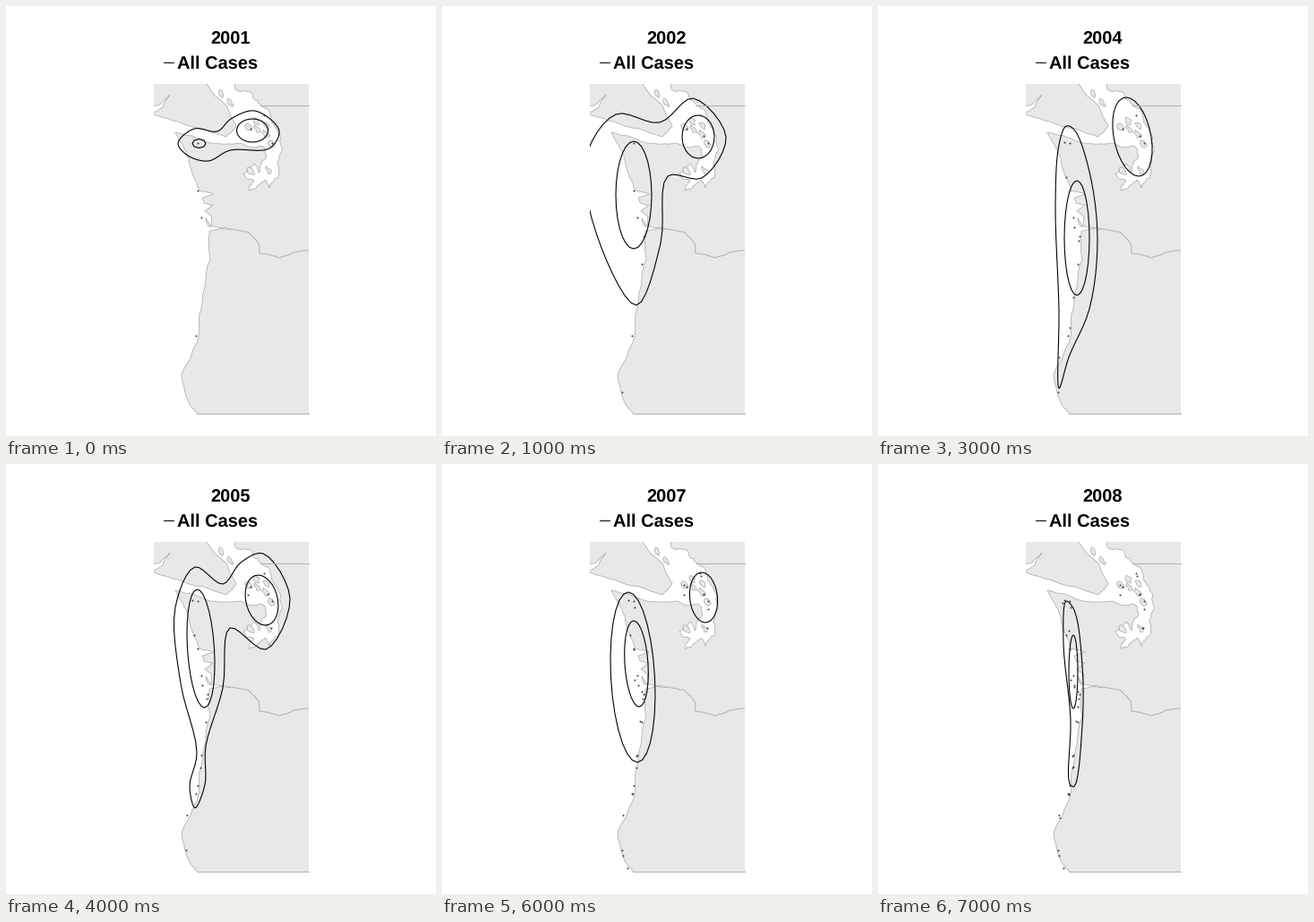
These frames come from a looping animation (480 by 480 pixels, 8000 ms). A matplotlib script:

```python
import matplotlib.pyplot as plt
import numpy as np
from matplotlib.animation import FuncAnimation
from matplotlib.patches import Polygon, Rectangle

SIZE, DPI = 480, 100
PX = 72 / DPI
LAND, SHORE = "#e8e8e8", "#b0b0b0"
YEARS = range(2001, 2009)

plt.rcParams["text.hinting"] = "none"
rng = np.random.default_rng(4)

fig = plt.figure(figsize=(SIZE / DPI, SIZE / DPI), dpi=DPI, facecolor="white")
ax = fig.add_axes([0, 0, 1, 1])
ax.set(xlim=(0, SIZE), ylim=(SIZE, 0))
ax.axis("off")

window = Rectangle((164.5, 87), 173, 368, fc=LAND, ec="none")
ax.add_patch(window)


def pairs(flat):
    return np.array(flat, float).reshape(-1, 2)


def rough(*flat, amp=0.06, depth=3):
    """Open line through key points, broken up by midpoint displacement."""
    p = pairs(flat)
    for _ in range(depth):
        step = np.diff(p, axis=0)
        normal = step[:, ::-1] * [-1, 1]
        mid = p[:-1] + step / 2 + normal * rng.uniform(-amp, amp, (len(step), 1))
        p = np.vstack([np.stack([p[:-1], mid], axis=1).reshape(-1, 2), p[-1:]])
    return p


def blob(*flat, steps=6):
    """Closed smooth curve through key points."""
    p = pairs(flat)
    after = np.roll(p, -1, axis=0)
    d = np.sqrt(np.linalg.norm(after - p, axis=1))[:, None]
    v = (after - p) / d
    d0, v0 = np.roll(d, 1, axis=0), np.roll(v, 1, axis=0)
    m = (v0 * d + v * d0) / (d + d0)
    m1 = np.roll(m, -1, axis=0)
    parts = [p * (1 + 2 * u) * (1 - u) ** 2 + after * u * u * (3 - 2 * u)
             + d * (m * u * (1 - u) ** 2 - m1 * u * u * (1 - u))
             for u in np.arange(steps) / steps]
    return np.stack(parts, axis=1).reshape(-1, 2)


def oval(cx, cy, rx, ry, lean=0, corners=28):
    """Ellipse whose lower end is shifted sideways by lean."""
    t = np.arange(corners) * 2 * np.pi / corners
    return np.column_stack([cx + rx * np.cos(t) + lean * np.sin(t),
                            cy + ry * np.sin(t)])


def shape(points, color):
    patch = ax.add_patch(Polygon(points, fc=color, ec=SHORE, lw=0.8 * PX))
    patch.set_clip_path(window)


def border(points):
    ax.plot(*points.T, color=SHORE, lw=PX)


# Water is one polygon: island shore, sound, strait, then the open coast
island_shore = rough(
    150, 111, 170, 111, 183, 99, 175, 113, 162, 120, 192, 129, 246, 146,
    257, 134, 247, 113, 233, 100, 222, 84, 220, 75)
sound = rough(
    255, 75, 257, 94, 271, 95, 284, 110, 296, 124, 303, 139, 308, 158,
    303, 175, 304, 191, 294, 203, 289, 194, 282, 200, 271, 206, 277, 195,
    265, 187, 278, 176, 283, 186, 290, 170, 287, 157, 273, 158, amp=0.2)
coast = rough(
    262, 153, 225, 152, 189, 141, 204, 170, 216, 206, 231, 210, 219, 214,
    221, 220, 231, 222, 222, 229, 230, 235, 229, 246, 223, 237, 226, 246,
    252, 249, 227, 251, 228, 283, 222, 313, 213, 376, 196, 412, 202, 438,
    213, 454.5, 213, 480, 150, 480)
shape(np.vstack([island_shore, sound, coast]), "white")

for cx, cy in pairs([271, 135, 279, 128, 280, 137, 290, 143, 296, 154,
                     291, 133, 293, 183, 273, 185, 240, 98, 250, 108]):
    islet = oval(cx, cy, 3, 4, lean=2, corners=9)
    shape(islet + rng.uniform(-1.3, 1.3, islet.shape), LAND)

border(pairs([284, 111, 337.5, 111]))
border(pairs([213, 454.5, 337.5, 454.5]))
border(rough(252, 249, 270, 252, 282, 265, 283, 276, 305, 281, 337.5, 273))

rings = {}


def contours(year, *curves):
    rings[year] = []
    for curve in curves:
        patch = Polygon(curve, fill=False, ec="black", lw=1.1 * PX, visible=False)
        rings[year].append(ax.add_patch(patch))
        patch.set_clip_path(window)


contours(2001,
         blob(192, 153, 210, 137, 236, 140, 251, 126, 278, 117, 305, 139,
              294, 159, 250, 161, 226, 173, 203, 167),
         oval(275, 139, 17.5, 13), oval(215.5, 153.5, 7.5, 5, corners=8))
contours(2002,
         blob(160, 172, 194, 121, 243, 130, 280, 103, 317, 146, 290, 192,
              252, 190, 244, 265, 217, 334, 178, 270),
         oval(214, 211, 20, 60), oval(286, 146, 18, 24))
contours(2003,
         blob(189, 150, 211, 103, 238, 129, 245, 152, 243, 200, 236, 310,
              216, 376, 210, 387, 206, 377, 200, 300, 195, 220),
         blob(201, 160, 213, 132, 226, 148, 228, 200, 227, 268, 218, 281,
              209, 220),
         oval(285, 144, 35.5, 62), oval(288, 144, 20, 37))
contours(2004,
         blob(210, 134, 219, 138, 236, 185, 245, 260, 236, 338, 213, 392,
              202, 427, 202, 340, 198, 220, 202, 155),
         oval(222, 259, 14, 64), oval(284, 146, 21, 44, lean=7))
contours(2005,
         blob(189, 160, 211, 115, 242, 134, 262, 110, 287, 100, 317, 150,
              290, 207, 250, 183, 242, 250, 223, 315, 222, 358, 211, 384,
              205, 360, 213, 322, 195, 245),
         oval(217.5, 206, 15, 66, lean=4), oval(285.5, 152, 18, 28, lean=4))
contours(2006,
         oval(217.5, 221, 25.5, 90, lean=5), oval(217.5, 218, 15, 51, lean=4),
         oval(291.5, 149, 28.5, 45.5, lean=2), oval(295, 149, 13, 21))
contours(2007,
         oval(213, 238, 24.5, 95, lean=5), oval(217, 223, 13, 48, lean=3),
         oval(292, 149, 15.5, 28, lean=2))
contours(2008,
         blob(210, 153, 219, 163, 228, 225, 228, 292, 219, 360, 214, 357,
              215, 285, 207, 200),
         oval(218, 232, 5, 41))

# Places with reports, most regular first; busy years repeat them nearby
sites = pairs([
    214, 153, 214, 206, 218, 236, 212, 368, 273, 137, 297, 153, 288, 122,
    201, 431, 225, 257, 223, 288, 292, 145, 218, 325, 224, 262, 214, 359,
    210, 191, 202, 392, 208, 152, 219, 247, 296, 183, 217, 339, 270, 146,
    207, 451])
counts = dict(zip(YEARS, (7, 11, 14, 18, 21, 44, 34, 42)))
extra = sites + rng.normal(0, [1.5, 4], sites.shape)
extra[-1] = sites[-1]
reports = np.vstack([sites, extra])
dots, = ax.plot([], [], "o", ms=1.3 * PX, mfc="#555555", mec="#333333",
                mew=0.6 * PX)

bold = dict(family="Liberation Sans", weight="bold", size=20 * PX, va="baseline")
title = ax.text(250.3, 43, "", ha="center", **bold)
ax.text(191, 70, "All Cases", ha="left", **bold)
ax.plot([176, 187], [62.5, 62.5], color="black", lw=PX)


def draw(i):
    now = YEARS[i]
    title.set_text(str(now))
    dots.set_data(*reports[:counts[now]].T)
    for year, patches in rings.items():
        for patch in patches:
            patch.set_visible(year == now)
    return []


anim = FuncAnimation(fig, draw, frames=len(YEARS), interval=1000, repeat=True)
plt.show()
```
